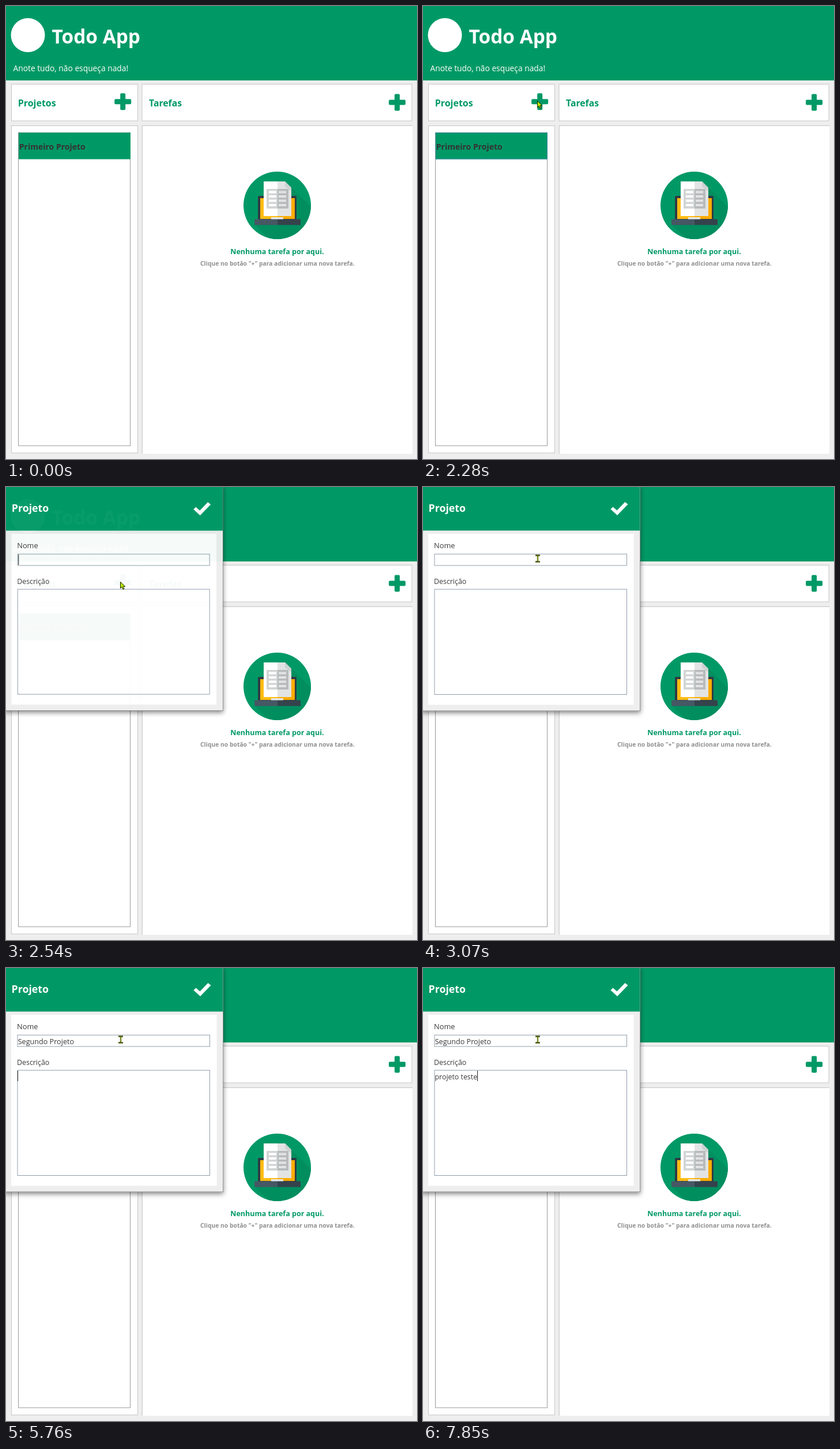
An HTML page that plays this animation: 713 px wide and 785 px high, repeating every 8000 ms.

```html
<!DOCTYPE html>
<html lang="pt">
<head>
<meta charset="utf-8">
<title>Todo App</title>
<style>
  html, body { margin: 0; width: 100%; height: 100%; overflow: hidden; background: #eee; }
  svg { display: block; width: 713px; height: 785px; }
  text { font-family: "Open Sans", "Noto Sans", sans-serif; white-space: pre; }
  .b { font-weight: 700; }
  .g { fill: #096; }
  .w { fill: #fff; }
  .panel { fill: #fff; stroke: #c8c8c8; }
  .field { fill: #fff; stroke: #8f9dab; }
  .form { fill: #3a3a3a; }
</style>
</head>
<body>
<svg viewBox="0 0 713 785">
  <defs>
    <path id="plus" class="g" d="M-2.5 -14.5h5a2 2 0 0 1 2 2v8h8a2 2 0 0 1 2 2v5a2 2 0 0 1 -2 2h-8v8a2 2 0 0 1 -2 2h-5a2 2 0 0 1 -2 -2v-8h-8a2 2 0 0 1 -2 -2v-5a2 2 0 0 1 2 -2h8v-8a2 2 0 0 1 2 -2z"/>
    <clipPath id="disc"><circle cx="470.5" cy="345.5" r="58.5"/></clipPath>
    <filter id="shade" x="-10%" y="-10%" width="120%" height="120%">
      <feDropShadow dx="0" dy="3" stdDeviation="4" flood-color="#000" flood-opacity=".5"/>
    </filter>
  </defs>

  <rect width="713" height="785" fill="#eee"/>
  <rect class="g" width="713" height="129"/>
  <circle class="w" cx="38" cy="50.5" r="29.5"/>
  <text class="b w" x="79.5" y="65" font-size="33.4">Todo App</text>
  <text class="w" x="12.5" y="112.5" font-size="13.8">Anote tudo, não esqueça nada!</text>

  <rect class="panel" x="9.5" y="135.5" width="219" height="63.5"/>
  <text class="b g" x="20.7" y="173.7" font-size="16">Projetos</text>
  <use href="#plus" x="202.7" y="165.7"/>
  <rect class="panel" x="236" y="135.5" width="468" height="63.5"/>
  <text class="b g" x="248" y="174.3" font-size="15.8">Tarefas</text>
  <use href="#plus" x="678.6" y="167"/>

  <rect class="panel" x="9.5" y="207.5" width="219" height="567"/>
  <rect x="21.5" y="219.5" width="194" height="542.5" fill="#fff" stroke="#999"/>
  <rect class="g" x="22" y="219.5" width="194" height="46"/>
  <rect id="focus" x="22" y="220" width="193.5" height="45" fill="none" stroke="#3f86a0"/>
  <text class="b" x="22.8" y="249" font-size="14" fill="#333">Primeiro Projeto</text>

  <rect class="w" x="236" y="207" width="469" height="569"/>
  <path d="M236.2 776V207.3H705" fill="none" stroke="#c0c0c0"/>

  <circle class="g" cx="470.5" cy="345.5" r="58.5"/>
  <g clip-path="url(#disc)">
    <path d="M495 314L560 379L500 447L432 379z" fill="#008e5f"/>
  </g>
  <rect x="437" y="329" width="67" height="42" rx="2" fill="#2f3b44"/>
  <rect x="441" y="333" width="30" height="36" fill="#ffbc14"/>
  <rect x="471" y="333" width="30" height="36" fill="#fbac00"/>
  <rect x="447" y="304" width="24" height="60" fill="#fff"/>
  <path d="M471 304H484L495 315V364H471z" fill="#e2e4e4"/>
  <path d="M484 304L495 315V321L484 313z" fill="#cdd2d2"/>
  <rect x="452" y="317" width="19" height="34" fill="#d3d6d6"/>
  <rect x="471" y="317" width="19" height="34" fill="#b7bbbc"/>
  <g id="cells"></g>
  <rect x="431" y="369.5" width="40" height="10" rx="1" fill="#465864"/>
  <rect x="471" y="369.5" width="40" height="10" rx="1" fill="#35434c"/>
  <rect x="460" y="366" width="21" height="3.5" fill="#e7e9e9"/>
  <text class="b g" x="389.3" y="430" font-size="12.5">Nenhuma tarefa por aqui.</text>
  <text class="b" x="337" y="450.3" font-size="10.35" fill="#909090">Clique no botão "+" para adicionar uma nova tarefa.</text>

  <g id="dialog">
    <rect x="-3" y="-3" width="380" height="391.3" fill="#777" filter="url(#shade)"/>
    <rect x="-2" y="-2" width="378.3" height="389.5" fill="#eee"/>
    <rect class="g" x="-2" y="-2" width="378.3" height="77.5"/>
    <text class="b w" x="9.5" y="43" font-size="17.8">Projeto</text>
    <path class="w" d="M325.5 38.5L329.5 34.5L336.5 40.5L350.5 26L355.5 30L337 49z"/>
    <rect class="w" x="9" y="81" width="356.5" height="296.5"/>
    <text class="form" x="19" y="106.3" font-size="12.8">Nome</text>
    <rect class="field" x="20" y="116.2" width="333.5" height="19.8"/>
    <text class="form" x="19" y="167.7" font-size="12.4">Descrição</text>
    <rect class="field" x="20" y="177.2" width="333.5" height="182.3"/>
    <text id="name" class="form" x="20.7" y="132" font-size="12.6"></text>
    <text id="note" class="form" x="20.5" y="192.5" font-size="12.4"></text>
    <rect id="caret" width="1" height="18" fill="#222"/>
  </g>

  <path id="arrow" d="M.5 .5V11.5L3.1 9.2L5 13.3L7 12.4L5.2 8.4H8.7z" fill="#b6e800" stroke="#1c2400"/>
  <g id="beam">
    <path d="M-4 -5.5H4M0 -5.5V5.5M-4 5.5H4" fill="none" stroke="#4c5a10" stroke-width="2.4"/>
    <path d="M0 -4V4" stroke="#a5c63a"/>
  </g>
</svg>
<script>
const LOOP = 8000;
const $ = id => document.getElementById(id);
const show = (id, on) => $(id).setAttribute('display', on ? 'inline' : 'none');
const snap = (t, from, step) => from + step * Math.floor((t - from) / step);

// table cells on the sheet of paper
for (let row = 0; row < 4; row++) {
  const y = 320.5 + row * 7.5;
  $('cells').innerHTML +=
    `<rect x="456" y="${y}" width="13" height="4" fill="#fff"/>` +
    `<rect x="473" y="${y}" width="13" height="4" fill="#e2e4e4"/>`;
}

// pointer stops: time, x, y
const path = [
  [330, 367, 653], [470, 249, 487], [610, 175, 360], [750, 124, 318],
  [890, 147, 285], [1030, 153, 311], [1100, 153, 311], [1170, 176, 282],
  [1310, 228, 203], [1450, 221, 186], [1590, 205, 167], [1730, 198, 157],
  [1870, 198, 157], [2010, 198, 164], [2670, 198, 164], [3060, 199, 124]
];

const entries = [
  { id: 'name', text: 'Segundo Projeto', x: 20.5, y: 117,
    keys: [3550, 3740, 3940, 4090, 4150, 4220, 4340, 4480, 4670, 4770, 4870, 5010, 5010, 5430, 5570] },
  { id: 'note', text: 'projeto teste', x: 20, y: 178,
    keys: [6490, 6590, 6690, 6830, 6910, 7000, 7090, 7240, 7310, 7390, 7590, 7780, 7850] }
];

function pointerAt(t) {
  const i = path.findIndex(p => p[0] > t);
  if (i < 0) return path[path.length - 1].slice(1);
  const a = path[Math.max(i - 1, 0)], b = path[i];
  const k = Math.max(0, (t - a[0]) / (b[0] - a[0]));
  return [a[1] + (b[1] - a[1]) * k, a[2] + (b[2] - a[2]) * k];
}

function drawPointer(t) {
  const [x, y] = pointerAt(t < 2150 ? snap(t, 330, 70) : snap(t, 2150, 65));
  const typing = t > 2600 && y < 137;
  show('arrow', t >= 330 && !typing);
  show('beam', typing);
  $(typing ? 'beam' : 'arrow').setAttribute('transform', `translate(${x} ${y})`);
}

function drawDialog(t) {
  const p = Math.min(1, Math.max(0, (snap(t, 2150, 65) - 2280) / 320));
  const ease = 1 - (1 - p) ** 2;
  const scale = 1 - 0.05 * (1 - ease);
  show('dialog', ease > 0);
  $('dialog').setAttribute('opacity', ease);
  $('dialog').setAttribute('transform', `translate(180 165) scale(${scale}) translate(-180 -165)`);
}

function drawTyping(t) {
  for (const e of entries) {
    $(e.id).textContent = e.text.slice(0, e.keys.filter(k => k <= t).length);
  }
  const e = entries[t < 5760 ? 0 : 1];
  const box = $(e.id);
  const width = box.textContent ? box.getComputedTextLength() : 0;
  $('caret').setAttribute('x', Math.round(e.x + width));
  $('caret').setAttribute('y', e.y);
  show('caret', !(t >= 2800 && t < 3330) && !(t >= 6290 && t < 6490));
}

function draw(t) {
  show('focus', t >= 1030);
  drawDialog(t);
  drawTyping(t);
  drawPointer(t);
}

const start = performance.now();
function tick() {
  draw((performance.now() - start) % LOOP);
  requestAnimationFrame(tick);
}
tick();
</script>
</body>
</html>
```
